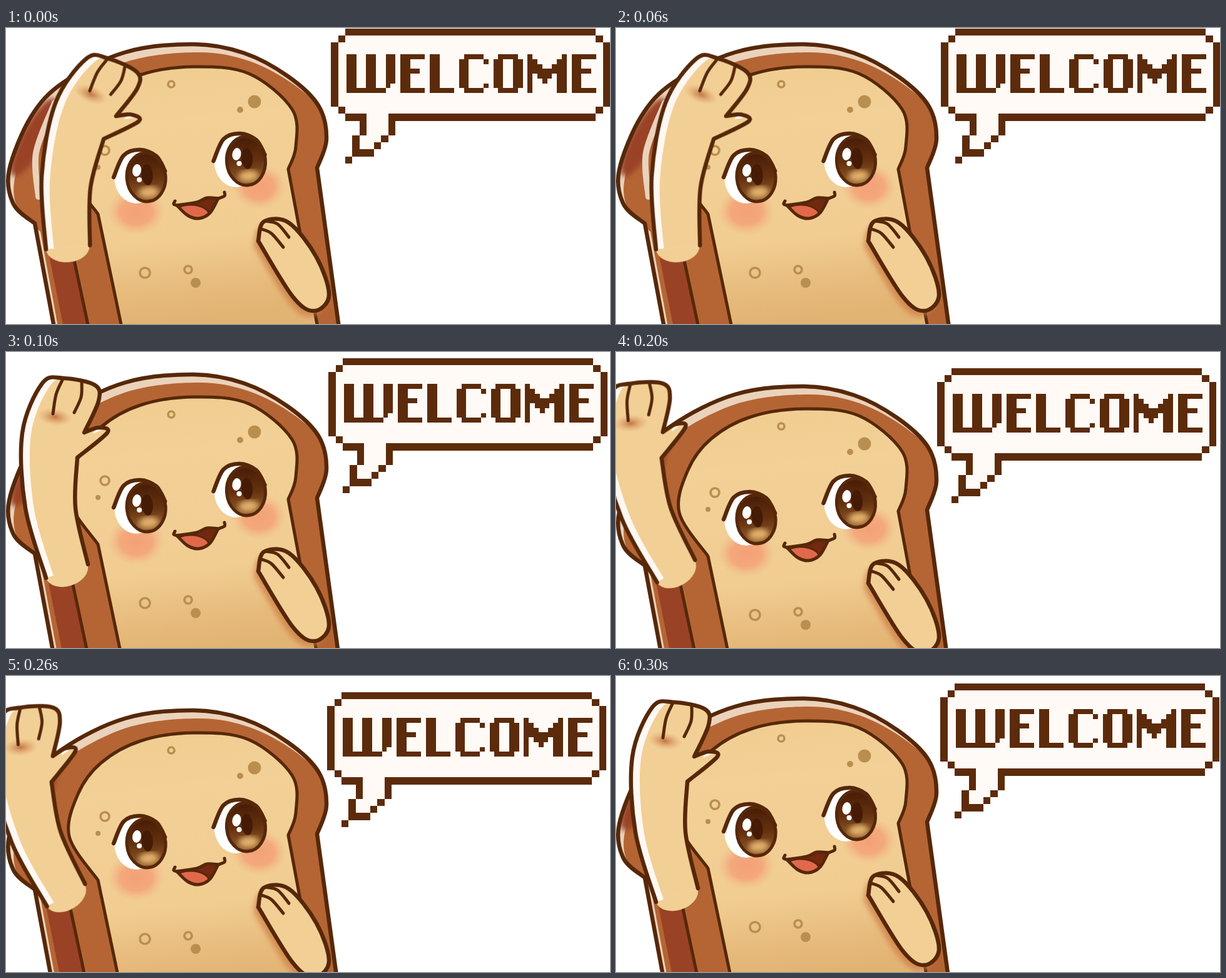
An HTML page for the animation above (0.4 s loop, 965x474 px).

```html
<!DOCTYPE html>
<html lang="en">
<head>
<meta charset="utf-8">
<title>Welcome toast</title>
<style>
  html, body { margin: 0; width: 100%; height: 100%; overflow: hidden; background: #fff; }
  svg { display: block; width: 100%; height: 100%; }
  .line { fill: none; stroke: #562809; stroke-width: 5; stroke-linecap: round; stroke-linejoin: round; }
  .bold { stroke-width: 6.5; }
  .skin { fill: #f2cf95; }
  .crust { fill: #b56534; }
  .pale { fill: #ebd2bb; }
  .red { fill: #9a4225; }
  .spot { fill: #b98f50; }
  .ring { fill: none; stroke: #b98f50; stroke-width: 3.6; }

  #body, #arm, #bubble { animation: 400ms step-end infinite; }
  #body { animation-name: bob; }
  #arm { animation-name: wave; transform-origin: 97px 358px; }
  #bubble { animation-name: float; }

  @keyframes bob {
    0% { transform: none; }
    25%, 75% { transform: translateY(10px); }
    50% { transform: translateY(29px); }
  }
  @keyframes wave {
    0% { transform: rotate(13deg); }
    25%, 75% { transform: none; }
    50% { transform: rotate(-12.5deg); }
  }
  @keyframes float {
    0% { transform: none; }
    25% { transform: translate(-4px, 9px); }
    50% { transform: translate(-6px, 25px); }
    75% { transform: translate(-1px, 11px); }
  }
</style>
</head>
<body>
<svg viewBox="0 0 965 474" role="img" aria-label="A slice of toast waves: WELCOME">
  <defs>
    <linearGradient id="crumb" x1="0" y1="0" x2=".1" y2="1">
      <stop offset="0" stop-color="#f0cc90"/>
      <stop offset=".25" stop-color="#f2d096"/>
      <stop offset=".7" stop-color="#f1cd92"/>
      <stop offset=".9" stop-color="#e6ba7b"/>
      <stop offset="1" stop-color="#e2b474"/>
    </linearGradient>
    <linearGradient id="iris" x1="0" y1="0" x2="0" y2="1">
      <stop offset="0" stop-color="#471c06"/>
      <stop offset=".5" stop-color="#64310f"/>
      <stop offset="1" stop-color="#96622f"/>
    </linearGradient>
    <radialGradient id="blush">
      <stop offset="0" stop-color="#f4a077"/>
      <stop offset=".55" stop-color="#f4a278" stop-opacity=".85"/>
      <stop offset="1" stop-color="#f2b686" stop-opacity="0"/>
    </radialGradient>
    <radialGradient id="smudge">
      <stop offset="0" stop-color="#c27444"/>
      <stop offset="1" stop-color="#dfa46c" stop-opacity="0"/>
    </radialGradient>
    <filter id="soft"><feGaussianBlur stdDeviation="4"/></filter>

    <path id="slice" data-through="77,480 46,313 | 46,313 12,282 5,228 40,142 92,87 190,39 300,26 380,40 450,77 499,124 512,178 497,224 | 497,224 532,480"/>
    <path id="face" data-through="185,480 147,298 | 147,298 101,228 115,160 152,110 215,75 300,62 388,73 457,130 463,190 451,226 | 451,226 498,480"/>
    <path id="paw" data-through="403,341 412,310 452,312 496,367 516,428 492,453 458,430 403,341"/>
    <path id="limb" data-through="64,362 31,250 26,130 58,50 92,42 142,53 148,78 125,129 | 125,129 148,121 162,129 114,169 | 114,169 111,250 131,340"/>
    <path id="mouth" data-through="273,284 305,279 321,272 339,273 | 339,273 326,296 308,305 290,300 273,284"/>
    <clipPath id="in-slice"><use href="#slice"/></clipPath>
    <clipPath id="in-limb"><use href="#limb"/></clipPath>
    <clipPath id="in-mouth"><use href="#mouth"/></clipPath>

    <g id="eye">
      <ellipse cx="-16" rx="35" ry="42" fill="#fff"/>
      <g transform="rotate(-5)">
        <ellipse rx="31" ry="39" fill="url(#iris)"/>
        <ellipse cx="2" cy="24" rx="16" ry="9" fill="#e2b06c" filter="url(#soft)"/>
        <ellipse cx="2" cy="-4" rx="9" ry="17" fill="#451b06"/>
        <ellipse class="line" rx="31" ry="39"/>
      </g>
      <path class="line bold" data-through="-52,0 -36,-35 -10,-44 16,-34 30,-10"/>
      <ellipse cx="-15" cy="-11" rx="7" ry="10" fill="#fff" transform="rotate(10 -15 -11)"/>
      <circle cx="-11" cy="4" r="4" fill="#fff"/>
    </g>
    <path id="E" d="M0 0h5v1H2v2h2v1H2v3h3v1H0z"/>
  </defs>

  <g id="body">
    <g clip-path="url(#in-slice)">
      <use class="pale" href="#slice"/>
      <use class="crust" href="#slice" x="9" y="13"/>
      <ellipse class="red" cx="44" cy="175" rx="20" ry="70" transform="rotate(28 44 175)" filter="url(#soft)"/>
      <path class="line" style="stroke: #ebd2bb; stroke-width: 10" data-through="78,120 48,200 52,270"/>
      <path class="red" d="M64 340H102L132 480H92z"/>
      <path class="line" d="M100 330 132 480"/>
    </g>
    <use href="#face" fill="url(#crumb)"/>
    <use class="line" href="#face"/>
    <use class="line bold" href="#slice"/>

    <g class="spot">
      <circle cx="397" cy="118" r="10.500"/>
      <circle cx="374" cy="131" r="5"/>
      <circle cx="147" cy="223" r="4"/>
      <circle cx="303" cy="408" r="8"/>
    </g>
    <g class="ring">
      <circle cx="264" cy="90" r="5"/>
      <circle cx="158" cy="196" r="7"/>
      <circle cx="222" cy="392" r="8"/>
      <circle cx="291" cy="387" r="6"/>
    </g>

    <ellipse cx="208" cy="294" rx="46" ry="38" fill="url(#blush)"/>
    <ellipse cx="404" cy="254" rx="44" ry="37" fill="url(#blush)"/>
    <use href="#eye" x="224" y="239"/>
    <use href="#eye" x="383.500" y="213"/>

    <g clip-path="url(#in-mouth)">
      <use href="#mouth" fill="#73280f"/>
      <ellipse class="line" cx="295" cy="300" rx="30" ry="17" style="fill: #e2684b; stroke-width: 3"/>
    </g>
    <use class="line" href="#mouth"/>
    <path class="line" data-through="270,277 268,282 273,284"/>
    <path class="line" data-through="339,273 349,269 349,263"/>

    <use href="#paw" x="-7" y="9" fill="#cf8049" opacity=".8" filter="url(#soft)"/>
    <use class="skin" href="#paw"/>
    <use class="line bold" href="#paw"/>
    <path class="line" data-through="408,322 424,329 443,351"/>
    <path class="line" data-through="414,309 434,314 452,335"/>
  </g>

  <g id="arm">
    <ellipse class="skin" cx="97" cy="351" rx="35" ry="24" transform="rotate(-18 97 351)"/>
    <g clip-path="url(#in-limb)">
      <use href="#limb" fill="#fff8f2"/>
      <use class="skin" href="#limb" x="14" y="2"/>
    </g>
    <ellipse cx="78" cy="104" rx="28" ry="14" fill="url(#smudge)" transform="rotate(8 78 104)"/>
    <use class="line bold" href="#limb"/>
    <path class="line" data-through="90,45 80,68 75,99"/>
    <path class="line" data-through="121,47 120,72 109,97"/>
  </g>

  <g id="bubble" fill="#5c2b0b" shape-rendering="crispEdges">
    <g transform="translate(519.200 .6) scale(11.430 11.400)">
      <path fill="#fffaf5" d="M2 1h35v1h1v9h-1v1H8v3H7v1H6v1H4v-2h1v-3H2v-1H1V2h1z"/>
      <path d="M2 0h35v1H2zM1 1h1v1H1zM37 1h1v1h-1zM0 2h1v9H0zM38 2h1v9h-1zM1 11h1v1H1zM37 11h1v1h-1z
               M2 12h3v3H4v-2H2zM8 12h29v1H9v2H8zM3 15h1v2h2v1H3zM6 16h1v1H6zM7 15h1v1H7zM2 18h1v1H2z"/>
    </g>
    <g transform="translate(544 42) scale(7.820 7.750)" fill-rule="evenodd">
      <path d="M0 0h2v7h2v-7h2v7h2v-7h2v6H9v1H8v1H0z"/>
      <use href="#E" x="11"/>
      <path transform="translate(17)" d="M0 0h2v7h3v1H0z"/>
      <path transform="translate(23)" d="M1 0h4v1H2v6h3v1H1V7H0V1h1zM5 1h1v1H5zM5 6h1v1H5z"/>
      <path transform="translate(30)" d="M1 0h4v1h1v6H5v1H1V7H0V1h1zM2 1v6h2V1z"/>
      <path transform="translate(37)" d="M0 0h1v1h1v1h1v1h2V2h1V1h1V0h1v8H6V4H5v1H4v1H3V5H2V4H1v4H0z"/>
      <use href="#E" x="46"/>
    </g>
  </g>
</svg>
<script>
  // Smooth curve through each run of points; "|" marks a corner.
  function smoothRun(points) {
    const at = i => points[Math.max(0, Math.min(points.length - 1, i))];
    return points.slice(1).map((end, i) => {
      const [before, start, after] = [at(i - 1), at(i), at(i + 2)];
      const c1 = start.map((v, k) => v + (end[k] - before[k]) / 6);
      const c2 = end.map((v, k) => v - (after[k] - start[k]) / 6);
      return `C${c1} ${c2} ${end}`;
    }).join('');
  }

  for (const path of document.querySelectorAll('[data-through]')) {
    const runs = path.dataset.through.split('|')
      .map(run => run.trim().split(/\s+/).map(p => p.split(',').map(Number)));
    path.setAttribute('d', runs.map((run, i) => `${i ? 'L' : 'M'}${run[0]}${smoothRun(run)}`).join(''));
  }
</script>
</body>
</html>
```
